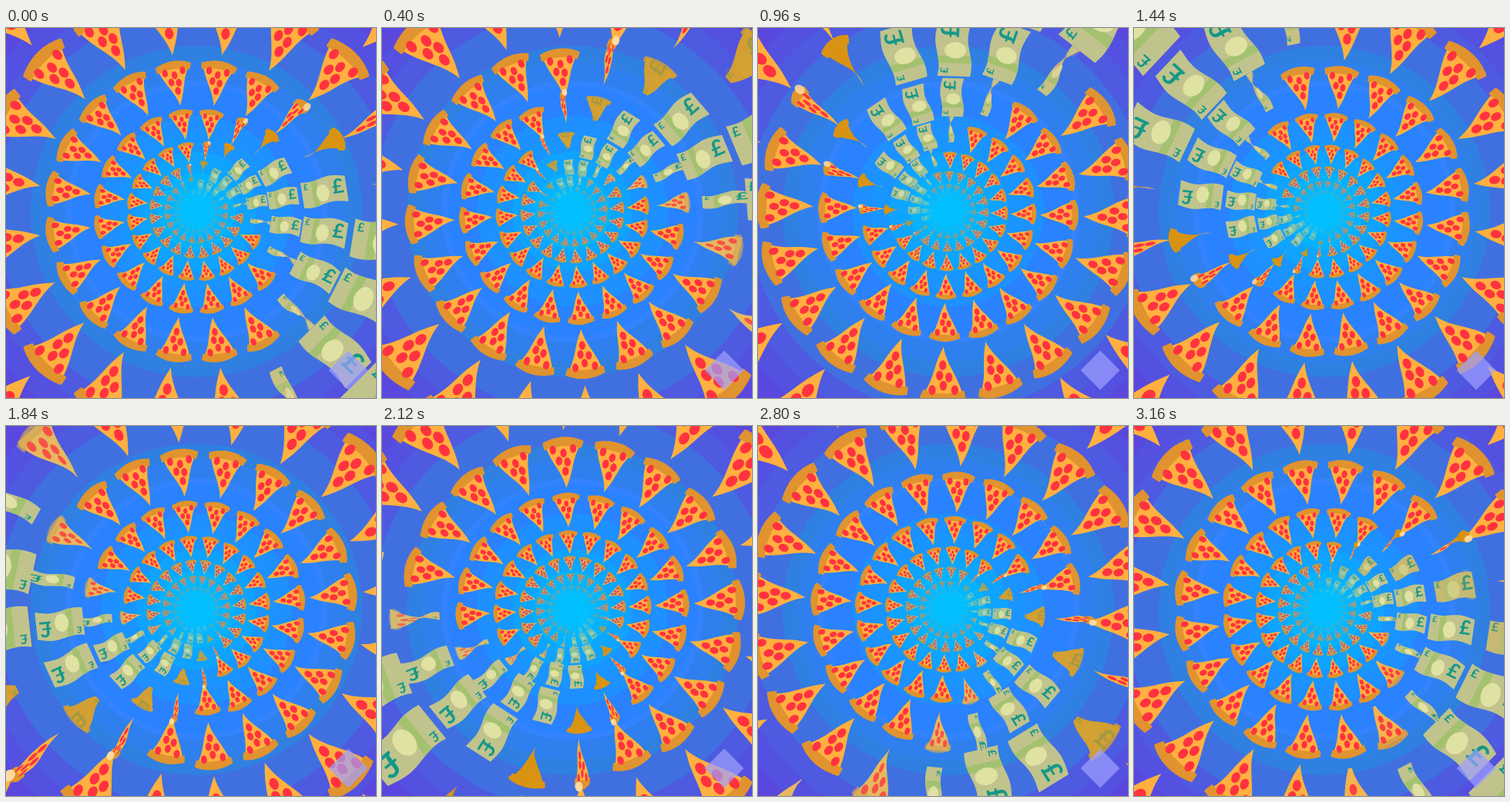
An HTML page with a canvas that plays this animation: 480x480 px, repeating every 3.2 s.

```html
<!DOCTYPE html>
<html lang="en">
<head>
<meta charset="utf-8">
<title>Pizza and money tunnel</title>
<style>
html, body { margin: 0; width: 100%; height: 100%; overflow: hidden; background: #5a48de; }
canvas { display: block; width: 480px; height: 480px; }
</style>
</head>
<body>
<canvas id="stage" width="480" height="480"></canvas>
<script>
const ctx = document.getElementById('stage').getContext('2d');
const TAU = Math.PI * 2, RAD = Math.PI / 180;
const LOOP = 3200, STEP = 40, CX = 247, CY = 238;
const SLOTS = 20, BASE = 168, GROWTH = 0.39;

const CHEESE = [255, 176, 64], CRUST = [224, 147, 46], BACK = [217, 147, 18];
const BILL = [193, 195, 140], CREAM = [255, 217, 160];

// radius and colour, outside in
const BANDS = [
  [400, '#5a48de'], [318, '#5450e0'], [290, '#4e5ae0'], [260, '#4070e0'],
  [215, '#2f80e0'], [195, '#2f80ee'], [170, '#3383ff'], [162, '#2a82ff'],
  [124, '#1e90ff'], [100, '#1a95ff'], [78, '#10a2ff'], [50, '#08b0ff']
];

// distance from the tip, side offset
const TOPPINGS = [[.33, .02], [.51, .38], [.54, -.4], [.69, .06], [.76, -.62], [.77, .66]];

const clamp = x => Math.max(0, Math.min(1, x));
const smooth = x => { x = clamp(x); return x * x * (3 - 2 * x); };
const lerp = (a, b, k) => a + (b - a) * k;
const mix = (a, b, k) => 'rgb(' + a.map((c, i) => Math.round(lerp(c, b[i], k))).join() + ')';
const bump = (x, mid, half) => {
  const d = Math.abs(x - mid) / half;
  return d < 1 ? .5 + .5 * Math.cos(d * Math.PI) : 0;
};

function fillPoly(points, color) {
  ctx.beginPath();
  for (const [x, y] of points) ctx.lineTo(x, y);
  ctx.closePath();
  ctx.fillStyle = color;
  ctx.fill();
}

function oval(x, y, rx, ry, color) {
  ctx.beginPath();
  ctx.ellipse(x, y, rx, Math.max(ry, .001), 0, 0, TAU);
  ctx.fillStyle = color;
  ctx.fill();
}

function background() {
  ctx.fillStyle = BANDS[0][1];
  ctx.fillRect(0, 0, 480, 480);
  for (const [r, color] of BANDS) oval(CX, CY, r, r, color);
}

// One slice in units of its ring radius: x runs outward, y clockwise.
function makeShape(phase) {
  const second = phase > 100;
  const start = second ? 122 : 44;
  // the whole slice tilts, then the twist runs from the rim to the tip
  const tilt = .37 * (second
    ? smooth((phase - start + 10) / 16)
    : smooth((phase - start + 7) / 9));
  const turn = v => Math.PI * (tilt +
    .63 * smooth((phase - start - 17 * (1 - v)) / (32 - 14 * (1 - v))));
  const bill = second ? 1 - smooth((phase - 130) / 25) : smooth((phase - 68) / 12);
  const hop = .1 * bump(phase, 60, 22) + .1 * bump(phase, 132, 24) - .03 * bump(phase, 36, 10);
  const tuck = .1 * bump(phase, 71, 9);
  const squeeze = v => Math.max(Math.abs(Math.cos(turn(v))),
    .2 * (1 - bill) * smooth((v - .45) / .3));
  const x = v => .827 + hop + .346 * v + tuck * (1 - v);
  const half = v => lerp(.122 * Math.pow(Math.min(1, v / .86), 1.08), .1, bill);
  const bend = v => lerp(.008, .013, bill) * Math.sin(TAU * v + .5);
  const at = (v, s) => [x(v), bend(v) + s * half(v) * squeeze(v)];
  return { second, turn, bill, squeeze, x, at };
}

function band(shape, inner, outer, wide) {
  const pts = [];
  for (let i = -6; i <= 6; i++) pts.push(shape.at(outer(i / 6), i / 6 * wide));
  for (let i = 6; i >= -6; i--) pts.push(shape.at(inner(i / 6), i / 6 * wide));
  return pts;
}

function pound(shape, v, s, size) {
  const [x, y] = shape.at(v, s);
  ctx.save();
  ctx.translate(x, y);
  ctx.scale(size / 40, size / 40 * shape.squeeze(v));
  ctx.fillText('£', 0, 0);
  ctx.restore();
}

function drawPizza({ bill, second, squeeze, at }) {
  ctx.globalAlpha = second ? Math.sqrt(1 - bill) : 1 - bill;
  for (const [v, s] of TOPPINGS) {
    const [x, y] = at(v, s);
    oval(x, y, .03, .022 * squeeze(v), '#ff3340');
  }
}

function drawBill(shape) {
  const { bill, squeeze, at } = shape;
  ctx.globalAlpha = Math.pow(bill, 3);
  fillPoly(band(shape, () => .23, () => .36, 1), '#a4c170');
  const [x, y] = at(.46, .15);
  oval(x, y, .05, .066 * squeeze(.46), '#dfe2a2');
  ctx.globalAlpha = Math.sqrt(bill);
  ctx.fillStyle = mix(BACK, [21, 152, 137], Math.sqrt(bill));
  pound(shape, .81, -.08, .155);
  pound(shape, .1, -.62, .064);
}

function drawFace(shape, isBack) {
  const { bill, at, second } = shape;
  const plain = isBack && !second;
  const end = lerp(.9, 1, bill);
  const left = [], right = [];
  for (let i = 0; i <= 12; i++) {
    const v = end * i / 12;
    left.push(at(v, -1));
    right.unshift(at(v, 1));
  }
  fillPoly(left.concat(right), mix(plain ? BACK : CHEESE, BILL, bill));

  if (bill < 1) {
    const color = mix(plain ? BACK : CRUST, BILL, bill);
    ctx.globalAlpha = 1 - bill;
    fillPoly(band(shape, s => .85 - .06 * s * s, s => .985 - .09 * s * s, 1.08), color);
    ctx.strokeStyle = color;
    ctx.lineWidth = .016;
    ctx.lineJoin = 'round';
    ctx.stroke();
    if (!plain) drawPizza(shape);
  }
  if (bill > 0 && isBack !== second) drawBill(shape);
  ctx.globalAlpha = 1;
}

function clipDraw(shape, from, to, isBack) {
  ctx.save();
  ctx.beginPath();
  ctx.rect(from, -1, to - from, 2);
  ctx.clip();
  drawFace(shape, isBack);
  ctx.restore();
}

function drawItem(phase) {
  const shape = makeShape(phase);
  const { turn, x, bill } = shape;
  const quarter = Math.PI / 2;
  if (turn(1) <= quarter) drawFace(shape, false);
  else if (turn(0) >= quarter) drawFace(shape, true);
  else {
    let lo = 0, hi = 1;
    for (let i = 0; i < 12; i++) {
      const mid = (lo + hi) / 2;
      if (turn(mid) < quarter) lo = mid; else hi = mid;
    }
    clipDraw(shape, 0, x(lo), false);
    clipDraw(shape, x(lo), 3, true);
  }
  // cut end of the crust, seen while the slice is edge-on
  const edge = smooth((Math.sin(turn(.95)) - .75) / .2) * (1 - bill);
  if (edge > 0) {
    ctx.globalAlpha = edge;
    const [ex, ey] = shape.at(.94, .6);
    oval(ex, ey, .034, .026, mix(CREAM, BILL, bill * .6));
    ctx.globalAlpha = 1;
  }
}

function draw(ms) {
  const t = ms / 1000;
  background();
  ctx.font = 'bold 40px Lato, Inter, sans-serif';
  ctx.textAlign = 'center';
  ctx.textBaseline = 'middle';
  for (let n = 2; n >= -9; n--) {
    const r = BASE * Math.exp(GROWTH * (n + t / 1.6));
    if (r > 430 || r < 14) continue;
    for (let j = 0; j < SLOTS; j++) {
      const base = 9 + 18 * j;
      const angle = (base + 11.25 * t - 90) * RAD;
      const phase = (((base - 18 * n + 112.5 * t) % 360) + 360) % 360;
      ctx.save();
      ctx.translate(CX, CY);
      ctx.rotate(angle);
      ctx.scale(r, r);
      drawItem(phase);
      ctx.restore();
    }
  }

  const glow = ctx.createRadialGradient(CX, CY, 0, CX, CY, 75);
  glow.addColorStop(0, 'rgba(0,191,255,1)');
  glow.addColorStop(.28, 'rgba(0,191,255,.95)');
  glow.addColorStop(.5, 'rgba(0,185,255,.38)');
  glow.addColorStop(1, 'rgba(0,175,255,0)');
  oval(CX, CY, 75, 75, glow);

  ctx.save();
  ctx.translate(444, 444);
  ctx.rotate(Math.PI / 4);
  ctx.fillStyle = 'rgba(158,160,255,.7)';
  ctx.fillRect(-18, -18, 36, 36);
  ctx.restore();
}

const start = performance.now();
function frame() {
  const ms = (performance.now() - start) % LOOP;
  draw(Math.floor(ms / STEP) * STEP);
  requestAnimationFrame(frame);
}
frame();
</script>
</body>
</html>
```
